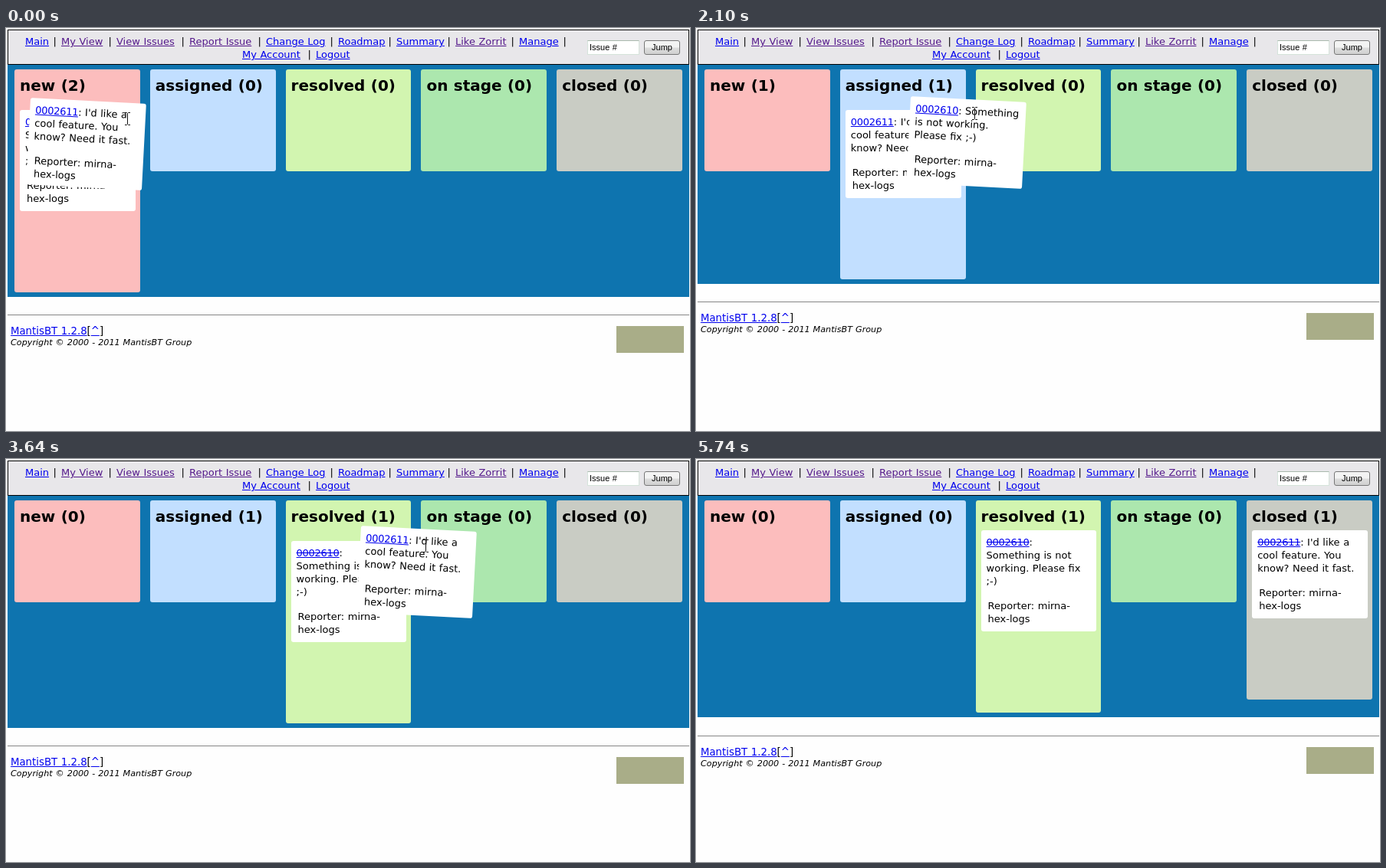
Animation of 892 by 526 pixels, one loop 6.3 s. Source, as an HTML page:

```html
<!DOCTYPE html>
<html lang="en">
<head>
<meta charset="utf-8">
<title>Issue board</title>
<style>
html, body { margin: 0; width: 100%; height: 100%; overflow: hidden; background: #fefefe; }
body { position: relative; font: 13px/17px "DejaVu Sans", sans-serif; word-spacing: .4px; color: #000; }
a { color: #00e; text-decoration: underline; }
a.seen { color: #551a8b; }
header { position: absolute; left: 2px; top: 2px; width: 889px; height: 46px; box-sizing: border-box; border: 1px solid #000; background: #e8e7ea; }
nav > * { position: absolute; white-space: pre; }
.field, .jump { position: absolute; box-sizing: border-box; font: 11px/16px "Liberation Sans", Arial, sans-serif; }
.field { left: 758px; top: 16px; width: 68px; height: 19px; padding-left: 2px; border: 1px solid #d5e3da; border-top-color: #a9b8ad; background: #fff; }
.jump { left: 832px; top: 16px; width: 47px; height: 19px; text-align: center; border: 1px solid #777; border-radius: 3px; background: linear-gradient(#f3f3f3 0 48%, #dedede 52%, #d0d0d0); }
main { position: absolute; left: 2px; top: 48px; width: 889px; }
.board { display: flex; align-items: flex-start; gap: 13px; padding: 6px 9px; background: #0e74af; }
.col { flex: 1 1 0; min-width: 0; padding: 9px 6px 0 7px; border-radius: 3px; }
h2 { margin: 0; font-size: 20px; line-height: 24px; white-space: pre; }
.list { display: flow-root; padding-bottom: 100px; }
.card { margin: 6px 0; padding: 7px 0 8px 7px; border-radius: 3px; background: #fff; white-space: pre; }
.card a { letter-spacing: -.27px; }
.done a { text-decoration: underline line-through; }
.by { margin: 15px 0 0 2px; }
.held { position: absolute; z-index: 2; width: 144px; margin: 0; padding-bottom: 6px; transform: rotate(3deg); }
.slot { height: 7.6px; margin: 6px 0; }
footer { position: relative; top: -.2px; }
footer > * { position: absolute; white-space: pre; }
.rule { top: 24px; width: 889px; height: 1px; background: #868686; }
.app { left: 4px; top: 37px; font-size: 13.3px; }
.copy { left: 4px; top: 54px; font: italic 11.2px/13px "DejaVu Sans", sans-serif; }
.badge { left: 794px; top: 39px; width: 88px; height: 35px; background: #a9ad88; }
.cursor { position: absolute; z-index: 3; left: -4px; top: -8px; }
</style>
</head>
<body>
<header></header>
<nav></nav>
<div class="field">Issue #</div>
<div class="jump">Jump</div>
<main>
  <div class="board"></div>
  <footer>
    <div class="rule"></div>
    <div class="app"><a>MantisBT 1.2.8</a>[<a>^</a>]</div>
    <div class="copy">Copyright © 2000 - 2011 MantisBT Group</div>
    <div class="badge"></div>
  </footer>
</main>
<svg class="cursor" width="9" height="17" fill="none" stroke="#111"><path d="M1 .5h2.500l1 1 1-1H8M4.500 1.500v14M1 16.500h2.500l1-1 1 1H8"/></svg>
<script>
const LOOP = 6300, STEP = 70, PITCH = 176.8, LEFT = 11;
const $ = s => document.querySelector(s);

function el(tag, cls, html, parent) {
  const e = document.createElement(tag);
  e.className = cls;
  e.innerHTML = html;
  if (parent) parent.append(e);
  return e;
}

function place(e, x, y) {
  e.style.left = x + 'px';
  e.style.top = y + 'px';
}

// Menu: label, x, visited
const menu = [
  [['Main', 25], ['My View', 72, 1], ['View Issues', 144, 1], ['Report Issue', 239, 1], ['Change Log', 339],
   ['Roadmap', 433], ['Summary', 509], ['Like Zorrit', 586, 1], ['Manage', 669], ['', 737]],
  [['My Account', 308], ['Logout', 404]]
];
menu.forEach((row, r) => row.forEach(([label, x, seen], i) => {
  const y = 9 + 17 * r;
  if (i) place(el('span', '', '|', $('nav')), x - 10.5, y);
  if (label) place(el('a', seen ? 'seen' : '', label, $('nav')), x, y);
}));

const cols = [['new', '#fcbdbd'], ['assigned', '#c2dfff'], ['resolved', '#d2f5b0'],
  ['on stage', '#ace7ae'], ['closed', '#c9ccc4']].map(([name, color]) => {
  const box = el('section', 'col', '', $('.board'));
  box.style.background = color;
  return { name, head: el('h2', '', '', box), list: el('div', 'list', '', box) };
});

const cardBox = (cls, id, text) =>
  el('div', cls, `<a>${id}</a>: ${text}<div class="by">Reporter: mirna-\nhex-logs</div>`);
const makeCard = (id, text, heldText) =>
  ({ rest: cardBox('card', id, text), held: cardBox('card held', id, heldText) });
const wish = "I'd like a\ncool feature. You\nknow? Need it fast.";
const feature = makeCard('0002611', wish, wish);
const bug = makeCard('0002610', '\nSomething is not\nworking. Please fix\n;-)',
  'Something\nis not working.\nPlease fix ;-)');
const cards = [feature, bug];
const slot = el('div', 'slot', '');

// Each drag: card, target column, pick-up and drop times, grip inside the card
const drags = [
  { card: feature, to: 1, start: 0, drop: 770, dx: 129.5, dy: 23.5 },
  { card: bug, to: 2, start: 1820, drop: 2590, dx: 86, dy: 18.5 },
  { card: feature, to: 4, start: 3360, drop: 4550, dx: 87, dy: 22.5 }
];

// Pointer path: time, x, y
const path = [
  [0, 158, 118], [350, 218, 114], [630, 277, 118], [840, 277, 118], [1120, 165, 112], [1330, 104, 113],
  [1750, 104, 113], [1890, 180, 113], [2100, 363, 111], [2310, 440, 107], [2450, 457, 106],
  [2590, 457, 106], [2870, 370, 110], [3220, 281, 116.5], [3290, 281, 116.5],
  [3640, 547, 113], [3990, 756, 92], [4060, 773, 93], [4200, 789, 102], [4970, 789, 102],
  [5180, 774, 180], [5460, 822, 334], [5670, 817.5, 440], [LOOP, 817.5, 440]
];

function pointer(t) {
  const i = path.findIndex(p => p[0] > t);
  const [a, b] = [path[i - 1], path[i]];
  const p = (t - a[0]) / (b[0] - a[0]);
  return [a[1] + (b[1] - a[1]) * p, a[2] + (b[2] - a[2]) * p];
}

function draw(t) {
  const [x, y] = pointer(t);
  const drag = drags.find(d => t >= d.start && t < d.drop);
  const home = card => drags.reduce((c, d) => d.card === card && t >= d.drop ? d.to : c, 0);
  const heldX = drag ? x - drag.dx : 0;
  const over = drag ? Math.floor((heldX + 75.5 - LEFT) / PITCH) : -1;

  cols.forEach((col, i) => {
    const mine = cards.filter(c => home(c) === i);
    const shown = mine.filter(c => !drag || c !== drag.card);
    shown.forEach(c => c.rest.classList.toggle('done', i > 1));
    col.head.textContent = `${col.name} (${mine.length})`;
    col.list.replaceChildren(...(over === i ? [slot] : []), ...shown.map(c => c.rest));
  });

  cards.forEach(c => {
    if (!drag || c !== drag.card) c.held.remove();
    else {
      if (!c.held.isConnected) document.body.append(c.held);
      place(c.held, heldX, y - drag.dy);
    }
  });

  const cursor = $('.cursor');
  cursor.style.transform = `translate(${Math.round(x)}px, ${Math.round(y)}px)`;
  cursor.style.visibility = t < 5740 ? 'visible' : 'hidden';
}

const begin = performance.now();
let last = -1;
function tick() {
  const t = Math.floor((performance.now() - begin) % LOOP / STEP) * STEP;
  if (t !== last) draw(last = t);
  requestAnimationFrame(tick);
}
tick();
</script>
</body>
</html>
```
